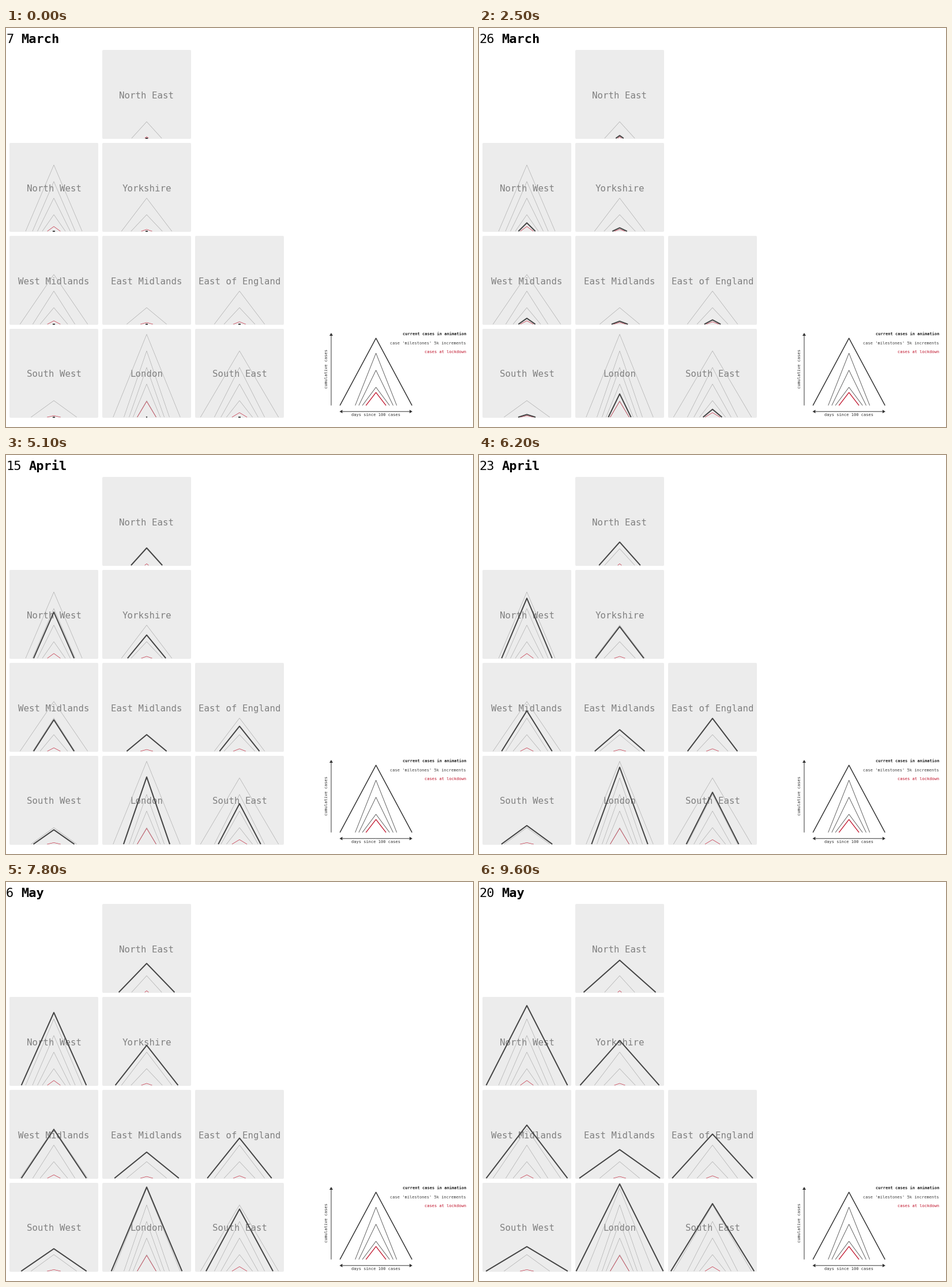
A matplotlib script that plays this animation: 810 px wide and 691 px high, repeating every 10 s.

```python
import numpy as np
import matplotlib.pyplot as plt
from matplotlib.animation import FuncAnimation
from matplotlib.patches import FancyBboxPatch, Polygon

W, H, DPI = 810, 691, 100
PX = 72 / DPI
FRAMES, LAST = 100, 96
DAYS, STEP = 74, 1.02          # days shown, pixels per day
LOCKDOWN = 16
MILESTONE = 28.7               # height of 5k cases
PITCH, TILE = 161, 154
DARK, GREY, RED = "#444444", "#a6a6a6", "#c0142c"
MONO = "DejaVu Sans Mono"

# name: column, row, first day, final height, day of fastest growth
REGIONS = {
    "North East": (1, 0, 12.7, 55.5, 33.5),
    "North West": (0, 1, 4.9, 138, 31.8),
    "Yorkshire": (1, 1, 6.8, 77.5, 34.5),
    "West Midlands": (0, 2, 4.9, 92, 31.3),
    "East Midlands": (1, 2, 5.4, 49.5, 31.8),
    "East of England": (2, 2, 5.4, 76.5, 32.4),
    "South West": (0, 3, 4.5, 42.5, 31.5),
    "London": (1, 3, 0, 151, 23),
    "South East": (2, 3, 3.2, 117, 30.9),
}

fig = plt.figure(figsize=(W / DPI, H / DPI), dpi=DPI, facecolor="white")
ax = fig.add_axes([0, 0, 1, 1])
ax.set(xlim=(0, W), ylim=(H, 0))
ax.axis("off")


def tent(x, base, half, height):
    return [x - half, x, x + half], [base, base - height, base]


def line(xs, ys, color, width, z=3):
    return ax.plot(xs, ys, color=color, lw=width * PX, zorder=z, snap=False,
                   solid_capstyle="butt", solid_joinstyle="round")[0]


def label(x, y, text, size, color, **kw):
    kw.setdefault("va", "baseline")
    return ax.text(x, y, text, fontsize=size * PX, color=color, family=MONO, **kw)


def arrow(tail, tip):
    tail, tip = np.array(tail, float), np.array(tip, float)
    along = (tip - tail) / np.hypot(*(tip - tail))
    side = 3 * along[::-1]
    neck = tip - 5 * along
    line(*zip(tail, neck), "#333333", 1)
    ax.add_patch(Polygon([tip, neck + side, neck - side], fc="#333333", lw=0, zorder=4))


class Region:
    """Cumulative cases as a Gompertz curve, drawn as a growing tent."""

    def __init__(self, name, col, row, start, final, peak):
        left, top = 6 + PITCH * col, 38 + PITCH * row
        self.x, self.base = left + TILE / 2, top + TILE - 1
        self.start, self.peak, self.spread = start, peak, 7 + peak / 4
        self.limit = final / self.share(DAYS)

        ax.add_patch(FancyBboxPatch((left + 2, top + 2), TILE - 4, TILE - 4,
                                    boxstyle="round,pad=2,rounding_size=2",
                                    fc="#ececec", lw=0, zorder=1))
        label(self.x, top + 83.5, name, 15.7, "#808080", ha="center", zorder=2)

        for height in np.arange(MILESTONE, final, MILESTONE):
            line(*self.shape(self.day_of(height)), GREY, 0.6)
        line(*self.shape(LOCKDOWN), RED, 0.6, 4)
        self.line = line([], [], DARK, 2, 5)

    def share(self, day):
        return np.exp(-np.exp((self.peak - day) / self.spread))

    def day_of(self, height):
        return self.peak - self.spread * np.log(-np.log(height / self.limit))

    def shape(self, day):
        half = max(STEP * (day - self.start), min(self.start + 1, 2))
        return tent(self.x, self.base, half, self.limit * self.share(day))

    def update(self, day):
        self.line.set_data(*self.shape(day))


def draw_legend():
    x, base = 641.7, 653.7
    line(*tent(x, base, 62.5, 116.5), "#333333", 1.5)
    for k in range(4):
        color, width = ("#555555", 0.9) if k else (RED, 1.3)
        height = 2 + 29.5 * k if k else 22.5
        line(*tent(x, base, 17.4 + 6.2 * k, height), color, width)

    arrow((564, base), (564, 528))
    arrow((x, 664.2), (x - 63.2, 664.2))
    arrow((x, 664.2), (x + 63.2, 664.2))

    size = 7.05
    notes = (("current cases in animation", "#222222", "bold"),
             ("case 'milestones' 5k increments", "#444444", "normal"),
             ("cases at lockdown", RED, "normal"))
    for i, (text, color, weight) in enumerate(notes):
        label(798, 531.8 + 15.7 * i, text, size, color, ha="right", weight=weight)
    label(x, 672, "days since 100 cases", size, "#333333", ha="center")
    label(556.5, 590.5, "cumulative cases", size, "#333333",
          ha="center", va="center", rotation=90)


def date_parts(day):
    n = 7 + day
    for month, length in (("March", 31), ("April", 30)):
        if n <= length:
            return str(n), month
        n -= length
    return str(n), "May"


regions = [Region(name, *spec) for name, spec in REGIONS.items()]
draw_legend()
day_text = label(0, 26, "", 22, "black")
month_text = label(0, 26, "", 22, "black", weight="bold")


def update(frame):
    day = min(frame, LAST) * DAYS / LAST
    number, month = date_parts(int(day + 1e-9))
    day_text.set_text(number)
    month_text.set_text(month)
    month_text.set_x(13.1 * (len(number) + 1))
    for region in regions:
        region.update(day)


anim = FuncAnimation(fig, update, frames=FRAMES, interval=100,
                     repeat=True, repeat_delay=0)
plt.show()
```
